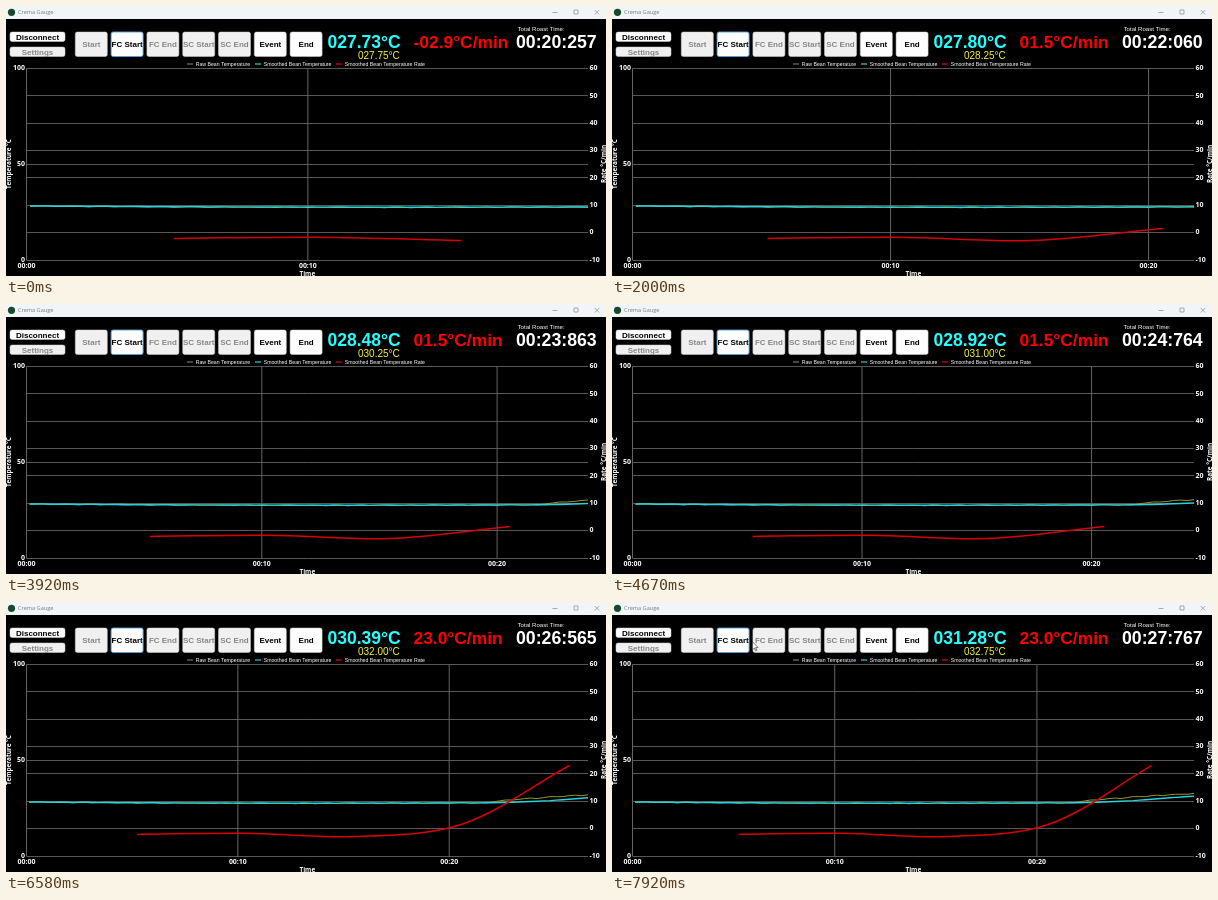
An HTML page with a canvas for the animation above (8000 ms loop, 600 by 270 pixels).

```html
<!DOCTYPE html>
<html lang="en">
<head>
<meta charset="utf-8">
<title>Crema Gauge</title>
<style>
  html, body { margin: 0; width: 100%; height: 100%; overflow: hidden; background: #000; }
  canvas { display: block; }
</style>
</head>
<body>
<canvas id="stage" width="600" height="270"></canvas>
<script>
const ctx = document.getElementById('stage').getContext('2d');
const LOOP = 8000;
const FIRST_SAMPLE = -67;
const UI = '"Liberation Sans", Arial, sans-serif';
const AXIS = '"Open Sans", "Noto Sans", sans-serif';
const PLOT = { left: 20.5, right: 582, top: 62.5, bottom: 254 };

// Sample 0 is the reading on screen when the loop starts; earlier ones are history.
// Samples arrive steadily, apart from one short slowdown.
const samplePhase = t => .1 + t / 307 - 1.1 * Math.exp(-(((t - 2800) / 800) ** 2));
const clockMs = k => Math.round(20257 + 300.41 * k + .9 * Math.sin(Math.PI * k / 20));
const seconds = k => clockMs(k) / 1000;

const WARMING = [[0, 27.73], [2, 27.72], [6, 27.8], [9, 28.03], [15, 28.92], [21, 30.39], [25, 31.28]];
const wobble = k => Math.cos(2 * Math.PI * (k - 15) / 3.5);
const settling = k => 27.73 + .016 * k + .00035 * k * k;
const smooth = k => k < 0 ? settling(k) + .06 * Math.sin(k * 1.7) : lerpKeys(WARMING, k);
const raw = k => {
  const base = k < 0 ? settling(k) : 27.75 + .57 * Math.max(0, k - 5) ** .72;
  return Math.round(4 * (base + .2 * wobble(k))) / 4;
};

// The rate is worked out once every 17 samples.
const RATES = [-2.1, -1.7, -2.9, 1.5, 23];
const rateSample = i => 17 * i - 50;
const rateCount = k => RATES.filter((_, i) => rateSample(i) <= k).length;

const tempY = v => PLOT.bottom - v * (PLOT.bottom - PLOT.top) / 100;
const rateY = v => PLOT.bottom - (v + 10) * (PLOT.bottom - PLOT.top) / 70;

function lerpKeys(keys, x) {
  let i = 1;
  while (i < keys.length - 1 && keys[i][0] < x) i++;
  const [x0, y0] = keys[i - 1], [x1, y1] = keys[i];
  return y0 + (y1 - y0) * (x - x0) / (x1 - x0);
}

function text(str, x, y, size, color, { bold = false, align = 'left', family = UI, middle = false } = {}) {
  ctx.font = `${bold ? 'bold ' : ''}${size}px ${family}`;
  ctx.fillStyle = color;
  ctx.textAlign = align;
  ctx.textBaseline = middle ? 'middle' : 'alphabetic';
  ctx.fillText(str, x, y);
}

function stroke(color, width) {
  ctx.strokeStyle = color;
  ctx.lineWidth = width;
  ctx.stroke();
}

function polyline(points, color, width) {
  ctx.beginPath();
  points.forEach(([x, y]) => ctx.lineTo(x, y));
  stroke(color, width);
}

// Bezier spline with handles scaled by the lengths of neighbouring segments.
function spline(points, color, width, tension = .65) {
  const mid = (a, b) => [(a[0] + b[0]) / 2, (a[1] + b[1]) / 2];
  const dist = (a, b) => Math.hypot(b[0] - a[0], b[1] - a[1]);
  const handle = (prev, p, next, target) => {
    const a = mid(prev, p), b = mid(p, next);
    const share = dist(prev, p) / (dist(prev, p) + dist(p, next));
    return p.map((v, i) => v + (target[i] - a[i] - (b[i] - a[i]) * share) * tension);
  };
  ctx.beginPath();
  ctx.moveTo(...points[0]);
  for (let i = 0; i < points.length - 1; i++) {
    const p = points[i], q = points[i + 1], m = mid(p, q);
    const c1 = handle(points[i - 1] || p, p, q, m);
    const c2 = handle(p, q, points[i + 2] || q, m);
    ctx.bezierCurveTo(...c1, ...c2, ...q);
  }
  stroke(color, width);
}

function button(label, x, y, w, h, enabled, focused) {
  ctx.beginPath();
  ctx.roundRect(x, y, w, h, 2);
  ctx.fillStyle = enabled ? '#fdfdfd' : '#f0f0f0';
  ctx.fill();
  stroke(focused ? '#4fa3dc' : '#d0d0d0', focused ? .9 : .5);
  text(label, x + w / 2, y + h / 2 + 3, 8, enabled ? '#000' : '#868686', { bold: true, align: 'center' });
}

function drawTitleBar() {
  ctx.fillStyle = '#f2f5f7';
  ctx.fillRect(0, 0, 600, 13);
  ctx.fillStyle = '#174a2c';
  ctx.beginPath();
  ctx.arc(5.5, 6.3, 3.6, 0, 7);
  ctx.fill();
  text('Crema Gauge', 12, 8.4, 5.6, '#777', { family: AXIS });
  polyline([[546.5, 6.5], [551.5, 6.5]], '#888', .7);
  ctx.strokeRect(568, 4, 4, 4);
  polyline([[588.7, 4], [593.2, 8.5]], '#888', .7);
  polyline([[593.2, 4], [588.7, 8.5]], '#888', .7);
}

function drawControls(k) {
  button('Disconnect', 4, 26, 55, 9.5, true);
  button('Settings', 4, 41, 55, 9.5, false);
  ['Start', 'FC Start', 'FC End', 'SC Start', 'SC End', 'Event', 'End'].forEach((label, i) =>
    button(label, 69.3 + i * 35.8, 26, 32, 24.5, [1, 5, 6].includes(i), i === 1));

  const pad = (n, digits, width) => (n < 0 ? '-' : '') + Math.abs(n).toFixed(digits).padStart(width, '0');
  const ms = clockMs(k);
  text(pad(smooth(k), 2, 6) + '°C', 321.5, 41.5, 17.5, '#2ff', { bold: true });
  text(pad(raw(k), 2, 6) + '°C', 352, 52.8, 10, '#f5f52a');
  text(pad(RATES[rateCount(k) - 1], 1, 4) + '°C/min', 407.5, 41.5, 17.4, '#f00', { bold: true });
  text('Total Roast Time:', 511.5, 25.2, 6.1, '#fff');
  text(`00:${Math.floor(ms / 1000)}:${pad(ms % 1000, 0, 3)}`, 510, 41.5, 17.7, '#fff', { bold: true });
}

function drawLegend() {
  [[181, '#77775a', 'Raw Bean Temperature'],
   [249, '#1fd5e0', 'Smoothed Bean Temperature'],
   [330, '#e00', 'Smoothed Bean Temperature Rate']].forEach(([x, color, label]) => {
    polyline([[x, 58], [x + 6, 58]], color, 1.2);
    text(label, x + 8.7, 60, 5.2, '#fff');
  });
}

function drawAxes(k, timeX) {
  const label = (str, x, y, align) =>
    text(str, x, y, 7, '#fff', { bold: true, align, family: AXIS, middle: true });
  const gridLine = y => polyline([[PLOT.left, y], [PLOT.right, y]], '#585858', 1);
  const crisp = y => Math.floor(y) + .5;

  for (let v = -10; v <= 60; v += 10) {
    gridLine(crisp(rateY(v)));
    label(v, 583.5, rateY(v), 'left');
  }
  gridLine(crisp(tempY(50)));
  for (const v of [0, 50, 100]) label(v, 19, tempY(v), 'right');
  for (let s = 0; s <= seconds(k); s += 10) {
    const x = timeX(s);
    polyline([[x, PLOT.top], [x, PLOT.bottom]], '#646464', 1);
    label('00:' + String(s).padStart(2, '0'), x, 260.5, 'center');
  }

  const title = (str, x, y, turn) => {
    ctx.save();
    ctx.translate(x, y);
    ctx.rotate(turn);
    text(str, 0, 0, 6.4, '#fff', { bold: true, align: 'center', family: AXIS, middle: true });
    ctx.restore();
  };
  title('Temperature °C', 3.5, 158, -Math.PI / 2);
  title('Rate °C/min', 598.8, 158, -Math.PI / 2);
  title('Time', 301.3, 268.5, 0);
}

function drawChart(k) {
  const scale = (PLOT.right - PLOT.left) / seconds(k);
  const timeX = s => PLOT.left + s * scale;
  drawAxes(k, timeX);

  const samples = Array.from({ length: k - FIRST_SAMPLE + 1 }, (_, i) => i + FIRST_SAMPLE);
  const trace = value => samples.map(i => [timeX(seconds(i)), tempY(value(i))]);
  polyline(trace(raw), '#96962c', 1);
  polyline(trace(smooth), '#22d4de', 1.4);
  const rates = RATES.slice(0, rateCount(k));
  spline(rates.map((v, i) => [timeX(seconds(rateSample(i))), rateY(v)]), '#d80000', 1.5);
}

function drawPointer(t) {
  const p = Math.min(1, (t - 7200) / 550);
  if (p <= 0) return;
  const away = (1 - p) ** 3;
  ctx.save();
  ctx.translate(140.5 + 60 * away, 39.8 + 240 * away);
  ctx.beginPath();
  [[0, 0], [0, 8], [1.9, 6.3], [3.1, 9], [4.3, 8.4], [3.1, 5.9], [5.6, 5.7]].forEach(([x, y]) => ctx.lineTo(x, y));
  ctx.closePath();
  ctx.fillStyle = '#fff';
  ctx.fill();
  stroke('#222', .6);
  ctx.restore();
}

function draw(now) {
  const t = now % LOOP;
  const phase = samplePhase(t);
  ctx.fillStyle = '#000';
  ctx.fillRect(0, 0, 600, 270);
  ctx.lineJoin = 'round';
  drawTitleBar();
  drawControls(Math.floor(phase));
  drawLegend();
  drawChart(Math.floor(phase - .4)); // the chart redraws shortly after the readouts
  drawPointer(t);
}

let start;
function tick(now) {
  start ??= now;
  draw(now - start);
  requestAnimationFrame(tick);
}
draw(0);
requestAnimationFrame(tick);
</script>
</body>
</html>
```
